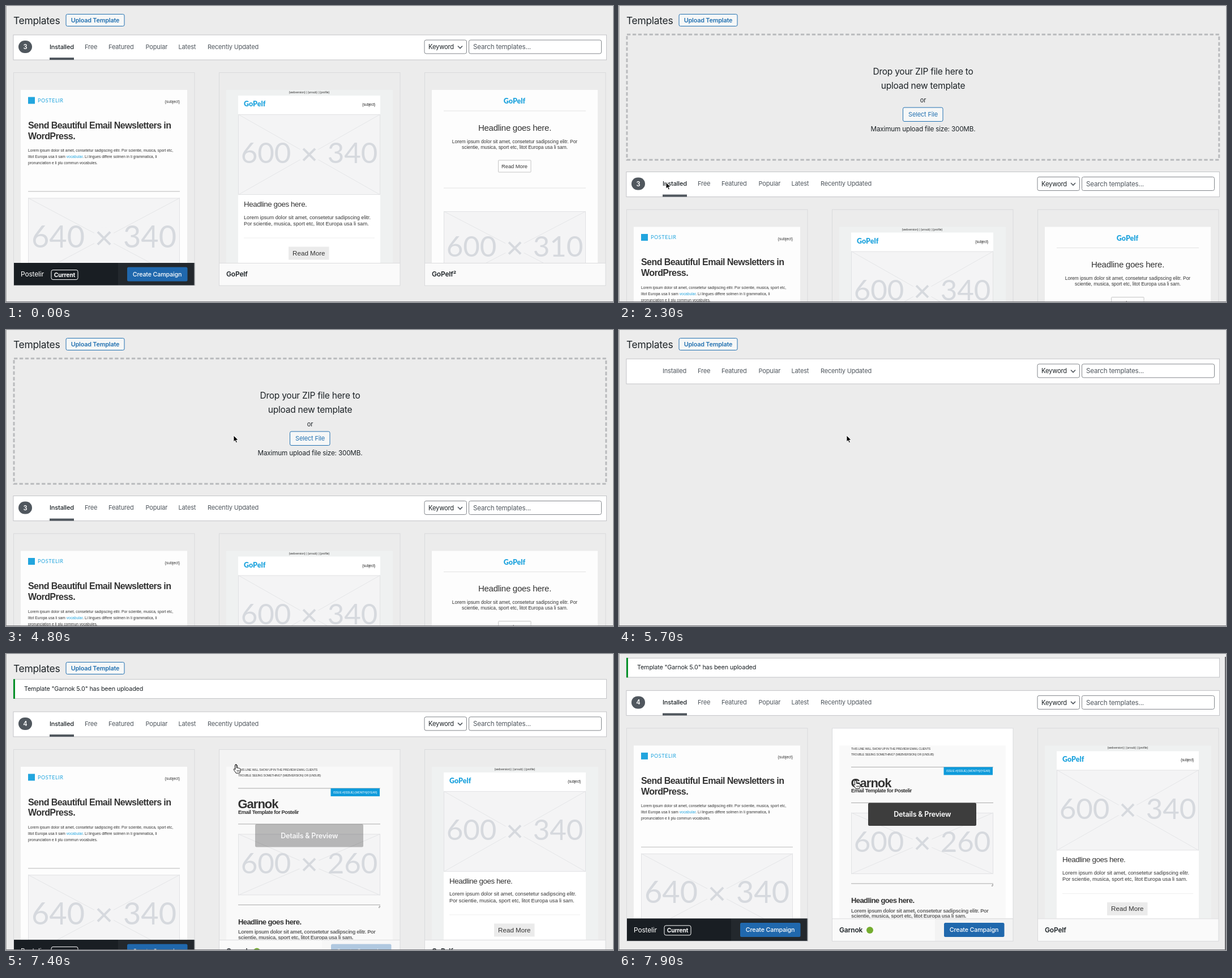
An HTML page that plays this animation: 1072x522 px, repeating every 8 s.

```html
<!DOCTYPE html>
<html lang="en">
<head>
<meta charset="utf-8">
<title>Template upload</title>
<style>
  html, body { margin: 0; width: 100%; height: 100%; overflow: hidden; background: #ececec; }
  svg { display: block; }
  text { font-family: Inter, sans-serif; letter-spacing: -.015em; fill: #1d2327; white-space: pre; }
  .mail { font-family: "Liberation Sans", Arial, sans-serif; letter-spacing: 0; fill: #333; }
  .lato { font-family: Lato, sans-serif; letter-spacing: 0; }
  .mid { text-anchor: middle; }
  .end { text-anchor: end; }
  .semi { font-weight: 600; }
  .bold { font-weight: 700; }
  .white { fill: #fff; }
  .blue { fill: #2271b1; }
  .brand { fill: #22a5de; }
  .gray { fill: #50575e; }
</style>
</head>
<body>
<svg id="stage" width="1072" height="522" viewBox="0 0 1072 522"></svg>
<script>
const LOOP = 8000, STEP = 100;
const LOREM = "Lorem ipsum dolor sit amet, consetetur sadipscing elitr.";
const SPORT = "scientie, musica, sport etc,";
const EUROPA = "litot Europa usa li sam";

const text = (x, y, size, str, cls = "", spacing) =>
  `<text x="${x}" y="${y}" font-size="${size}" class="${cls}"` +
  `${spacing === undefined ? "" : ` style="letter-spacing:${spacing}px"`}>${str}</text>`;
const mail = (x, y, size, str, cls = "", spacing) => text(x, y, size, str, "mail " + cls, spacing);
const rect = (x, y, w, h, fill, extra = "") =>
  `<rect x="${x}" y="${y}" width="${w}" height="${h}" fill="${fill}" ${extra}/>`;
const box = (x, y, w, h, fill, stroke, r = 0) =>
  rect(x + .5, y + .5, w - 1, h - 1, fill, `stroke="${stroke}" rx="${r}"`);
const line = (x1, y, x2, color, w = 1) =>
  `<path d="M${x1} ${y}H${x2}" stroke="${color}" stroke-width="${w}"/>`;
const group = (name, body, x = 0, y = 0) =>
  `<g data-name="${name}" transform="translate(${x} ${y})">${body}</g>`;

function placeholder(x, y, w, h, left, right, size = 51) {
  const cx = x + w / 2, cy = y + h / 2, base = cy - 3 + size * .36, gap = size * 1.5;
  const digits = (dx, n) =>
    `<text x="${cx + dx}" y="${base}" font-size="${size}" class="lato mid" style="fill:#d6d9de">${n}</text>`;
  const r = size * .205;
  return group("picture",
    box(x, y, w, h, "#f4f4f5", "#e1e2e4") +
    `<path d="M${x} ${y}l${w} ${h}M${x} ${y + h}l${w} ${-h}" stroke="#e4e5e7"/>` +
    group("digits",
      `<circle cx="${cx}" cy="${cy}" r="${size * .36}" fill="#f4f4f5"/>` +
      digits(-gap, left) + digits(gap, right) +
      `<path d="M${cx - r} ${cy - r}l${2 * r} ${2 * r}m0 ${-2 * r}l${-2 * r} ${2 * r}" stroke="#d6d9de" stroke-width="4"/>`));
}

const createButton = x =>
  rect(x, 343.5, 106.5, 25, "#2068ad", 'rx="2.5"') +
  text(x + 53, 360, 10.7, "Create Campaign", "mid white", undefined).replace("<text", '<text font-weight="500"');

function card(name, x, preview, footer, back = "") {
  return group(name, back + group("preview", preview) + footer +
    box(0, 0, 320.5, 376.5, "none", "#d9dadc"), x, 117);
}
const lightFooter = (title, extra = "") =>
  rect(0, 336, 320, 40, "#fafafa") + line(0, 336.5, 320, "#dcdcde") + extra +
  text(13, 360.3, 12, title, "semi");

const newsletterCard = card("newsletter", 13,
  rect(13, 31, 294, 305, "#fdfdfd") +
  rect(26, 43.5, 12, 12, "#22a5de") +
  text(43, 52.8, 9, "POSTELIR", "lato brand", .6) +
  mail(294, 54, 6.9, "{subject}", "end") +
  mail(26, 98.7, 16, "Send Beautiful Email Newsletters in", "bold", -.56) +
  mail(26, 117.5, 16, "WordPress.", "bold", -.56) +
  mail(26, 140, 6.7, `${LOREM} Por ${SPORT}`) +
  mail(26, 151, 6.7, `${EUROPA} <tspan fill="#22a5de">vocabular</tspan>. Li lingues differe solmen in li grammatica, li`) +
  mail(26, 162, 6.7, "pronunciation e li plu commun vocabules.") +
  line(26, 210, 294, "#cfcfcf", 1.5) +
  placeholder(26, 221.5, 268, 142, 640, 340, 54),
  rect(0, 336, 185, 40, "#191e23") + rect(185, 336, 135.5, 40, "#23282d") +
  text(13, 360.3, 12, "Postelir", "white") +
  box(66.5, 348, 48, 18, "none", "#fff", 3) +
  text(90.5, 361, 10.3, "Current", "mid bold white") + createButton(201));

const classicCard = card("classic", 376,
  rect(13, 31, 294, 305, "#eff1f1") +
  mail(159.5, 37, 5.07, "{webversion} | {unsub} | {profile}", "mid") +
  rect(34, 41, 251, 295, "#fff") +
  text(44, 60, 12.5, "GoPelf", "lato brand").replace("<text", '<text font-weight="900"') +
  mail(276, 59, 6.7, "{subject}", "end", -.3) +
  placeholder(34, 74, 251, 142, 600, 340) +
  mail(44, 237, 13.3, "Headline goes here.", "", -.4) +
  mail(44, 258.5, 9.2, LOREM) +
  mail(44, 270, 9.2, `Por ${SPORT} ${EUROPA}.`) +
  line(44, 292, 275, "#eee") +
  rect(123, 307.5, 71.5, 23, "#ebebeb") +
  mail(158.8, 323, 11.6, "Read More", "mid"),
  lightFooter("GoPelf"));

const centeredCard = card("centered", 739,
  rect(13, 31, 293, 305, "#fdfdfd") +
  text(159, 55, 12.5, "GoPelf", "lato mid brand").replace("<text", '<text font-weight="900"') +
  line(34, 68, 285, "#e2e2e2") +
  mail(159.5, 102.5, 15, "Headline goes here.", "mid", -.27) +
  mail(159.5, 124.5, 8.45, `${LOREM} Por`, "mid") +
  mail(159.5, 134.5, 8.45, `${SPORT} ${EUROPA}.`, "mid") +
  box(130, 154.5, 58.5, 22, "#fff", "#c4c4c4", 1) +
  mail(159, 168.5, 9.3, "Read More", "mid") +
  line(34, 204, 285, "#e2e2e2") +
  placeholder(34, 245, 251, 130, 600, 310),
  lightFooter("GoPelf²"));

const uploadedCard = card("uploaded", 376,
  rect(13, 31, 294, 305, "#f9f9f9") +
  mail(34, 38.3, 5.2, "THIS LINE WILL SHOW UP IN THE PREVIEW EMAIL CLIENTS", "", -.16) +
  mail(34, 48.5, 5.2, "TROUBLE SEEING SOMETHING? {WEBVERSION} OR {UNSUB}", "", -.16) +
  line(34, 69, 285, "#aaa") +
  rect(197.5, 69, 86.5, 14, "#0f9bdb") +
  mail(240.7, 78, 5.1, "ISSUE #{ISSUE} {MONTH}/{YEAR}", "mid white", -.1) +
  mail(33.5, 104.5, 22, "Garnok", "bold", -1) +
  mail(34, 114, 9.2, "Email Template for Postelir", "bold", -.4) +
  line(34, 132, 285, "#aaa") +
  placeholder(34, 149.5, 251, 108, 600, 260) +
  line(34, 274.5, 285, "#aaa") +
  mail(285, 280, 5, "//", "end") +
  mail(34, 309, 13, "Headline goes here.", "bold", -.6) +
  `<g opacity=".75">${mail(34, 325.5, 9.2, `${LOREM} Por`, "bold", -.33)}
   ${mail(34, 335, 9.2, `${SPORT} ${EUROPA}.`, "bold", -.33)}</g>`,
  lightFooter("Garnok", '<circle cx="67" cy="356.5" r="6" fill="#74ad2f"/>') +
  group("details",
    rect(182, 337, 138, 39, "#f3f3f3") + line(182, 336.5, 320, "#dcdcde") + createButton(198) +
    rect(64, 132, 191, 40.5, "#3d3d3d", 'rx="2.5"') +
    text(159.7, 157, 12.5, "Details &amp; Preview", "mid semi white")),
  group("highlight", rect(0, 0, 320, 376, "#fff")));

const tabs = [[139, "Free"], [181, "Featured"], [246.5, "Popular"], [304.5, "Latest"], [356, "Recently Updated"]];
const filterBar =
  box(12.5, 50.5, 1048.5, 45, "#fff", "#c3c4c7") +
  text(77, 75.7, 11, "Installed", "gray").replace("<text", '<text data-name="installed"') +
  tabs.map(([x, label]) => text(x, 75.7, 11, label, "gray")).join("") +
  group("selected",
    rect(22, 61, 24, 22, "#50575e", 'rx="11"') +
    text(34, 76, 11.2, "3", "mid semi white").replace("<text", '<text data-name="count"') +
    rect(77, 91, 43, 4, "#50575e")) +
  box(738.5, 59.5, 75.5, 25, "#fff", "#82868b", 3) +
  text(746, 76.3, 11.2, "Keyword") +
  '<path d="M798 70.5l4 4 4-4" fill="none" stroke="#50575e" stroke-width="1.6"/>' +
  box(817, 59.5, 235, 25, "#fff", "#82868b", 3) +
  text(825, 76.3, 11.6, "Search templates...", "gray");

const dropZone = group("zone",
  rect(14, 50.2, 1045.8, 221, "none", 'data-name="border" stroke-width="3" stroke-dasharray="6.3 3.6"') +
  text(537, 120.5, 15.5, "Drop your ZIP file here to", "mid") +
  text(537, 145.7, 15.5, "upload new template", "mid") +
  text(537, 170, 11, "or", "mid") +
  box(501, 178.5, 71.5, 25.5, "#f6f7f7", "#2271b1", 2.5) +
  text(537, 195, 11, "Select File", "mid blue") +
  text(537, 221, 11.7, "Maximum upload file size: 300MB.", "mid"));

const notice = group("notice",
  box(12.5, 44.3, 1048.5, 34.7, "#fff", "#c3c4c7") + rect(13, 44.3, 3, 34.7, "#00922a") +
  text(32, 64.5, 10.8, 'Template "Garnok 5.0" has been uploaded'));

const header =
  text(13, 31.7, 17.4, "Templates") +
  rect(106, 14.5, 103, 21, "#f6f7f7", 'data-name="uploadBox" rx="2.5"') +
  text(157.5, 29.3, 10.8, "Upload Template", "mid semi").replace("<text", '<text data-name="uploadLabel"');

const dragGhost = group("ghost",
  rect(-31, -6, 8, 13, "#fafafa", 'stroke="#d0d0d0" stroke-width=".5"') + rect(-28, -4, 1.5, 6, "#777") +
  rect(-20, -6.3, 62, 13.6, "#1b63d6", 'rx="6.8"') +
  text(-17, 4.3, 11, "garnok.zip", "white") +
  '<circle cy="2" r="32.3" fill="none" stroke="#111" stroke-width="1.5"/>' +
  '<circle cx="7.5" cy="19" r="7.8" fill="#2a9c1c"/><path d="M3 19h9m-4.5-4.5v9" stroke="#fff" stroke-width="2"/>');
const pointer = group("cursor", dragGhost +
  group("arrow", '<path d="M0 0v11.2l2.6-2.4 1.8 4.2 2-.9-1.8-4H8.2z" fill="#000" stroke="#fff" stroke-width=".9"/>') +
  group("hand", '<path d="M-1.5 8V1Q-1.5-.6 0-.6T1.5 1V5Q3-.1 0 0M1.5 5.5q1.3-1.1 2.4.2 1.4-.8 2.2.5 1.9-.3 2 1.7-.1 3.6-1.6 6.6H0Q-1.4 11.8-3.7 9q-1.1-1.7.2-2 1 .1 2 1.4V1Q-1.5-.6 0-.6T1.5 1z" fill="#fff" stroke="#111" stroke-width="1"/><path d="M2 9v3m1.8-3v3m1.8-3v3" stroke="#111" stroke-width=".7"/>'));

const stage = document.getElementById("stage");
stage.innerHTML = rect(0, 0, 1072, 522, "#ececec") +
  group("page", header + dropZone + notice +
    group("list", filterBar + group("cards", newsletterCard + classicCard + centeredCard + uploadedCard))) +
  rect(0, 0, 1, 522, "#aaa") + rect(0, 521, 1072, 1, "#77777c") +
  group("scrollbar", rect(1070, 5, 2, 517, "#66666b")) + pointer;

const find = (name, root = stage) => root.querySelector(`[data-name="${name}"]`);
const ui = {};
stage.querySelectorAll("[data-name]").forEach(el => ui[el.dataset.name] = el);
const cards = ["newsletter", "classic", "centered", "uploaded"].map(name => ui[name]);

const show = (el, on) => el.setAttribute("visibility", on ? "inherit" : "hidden");
const move = (el, x, y) => el.setAttribute("transform", `translate(${x} ${y})`);
const clamp = v => Math.max(0, Math.min(1, v));
const ease = v => v * v * (3 - 2 * v);
const between = (t, a, b) => t >= a && t < b;

const path = [
  [400, 455, 356], [1100, 165, 29], [1600, 165, 29], [2300, 83, 311], [2900, 83, 311], [3000, 98, 505],
  [3900, 982, 364], [4500, 402, 186], [7300, 402, 186], [7600, 418, 223]
];
function cursorAt(t) {
  const i = path.findIndex(p => t <= p[0]);
  if (i <= 0) return (i ? path[path.length - 1] : path[0]).slice(1);
  const [t0, x0, y0] = path[i - 1], [t1, x1, y1] = path[i];
  const k = ease((t - t0) / (t1 - t0));
  return [x0 + (x1 - x0) * k, y0 + (y1 - y0) * k];
}

function render(t) {
  const zoneOpen = between(t, 1300, 5700), uploaded = t >= 5700;
  const reveal = ease(clamp((t - 5800) / 500));
  const listReady = t < 5700 || t >= 6500;
  const [x, y] = cursorAt(t);

  move(ui.page, 0, t >= 7900 ? -37.5 : t >= 7800 ? -9 : 0);
  move(ui.list, 0, zoneOpen ? 241.5 : 50.9 * reveal);
  show(ui.zone, zoneOpen);
  show(ui.notice, reveal > 0);
  ui.notice.setAttribute("opacity", reveal);
  show(ui.selected, listReady);
  show(ui.cards, listReady);
  ui.installed.style.fill = listReady ? "#1d2327" : "";
  ui.installed.style.fontWeight = listReady ? 500 : 400;
  ui.count.textContent = uploaded ? 4 : 3;

  const hover = between(t, 1000, 1800), tone = hover ? "#0a4b78" : "#2271b1";
  ui.uploadBox.setAttribute("stroke", tone);
  ui.uploadLabel.style.fill = tone;

  show(ui.centered, !uploaded && listReady);
  show(ui.uploaded, uploaded && listReady);
  move(ui.classic, uploaded ? 739 : 376, 117);
  cards.forEach(el => {
    const early = el === ui.classic ? 6700 : 6900;
    show(find("preview", el), el === ui.centered ? !uploaded && listReady : listReady && (!uploaded || t >= early));
    show(find("picture", el), listReady && (!uploaded || t >= 7000) && (el !== ui.centered || !uploaded));
  });
  show(find("digits", ui.uploaded), t >= 7200);
  const focus = clamp((t - 7300) / 300);
  ui.details.setAttribute("opacity", focus);
  ui.highlight.setAttribute("opacity", focus);

  const dragging = between(t, 3900, 4800), hand = between(t, 1000, 1700) || t >= 7400;
  const visible = between(t, 100, 3100) || t >= 3900;
  ui.border.setAttribute("stroke", dragging && y < 272 ? "#83b4d8" : "#b9bbbd");
  move(ui.cursor, x, y);
  show(ui.cursor, visible);
  show(ui.ghost, visible && dragging);
  show(ui.arrow, visible && !hand);
  show(ui.hand, visible && hand);
  show(ui.scrollbar, t >= 7900);
}

function frame() {
  const t = performance.now() % LOOP;
  render(Math.floor(t / STEP) * STEP);
  requestAnimationFrame(frame);
}
frame();
</script>
</body>
</html>
```
